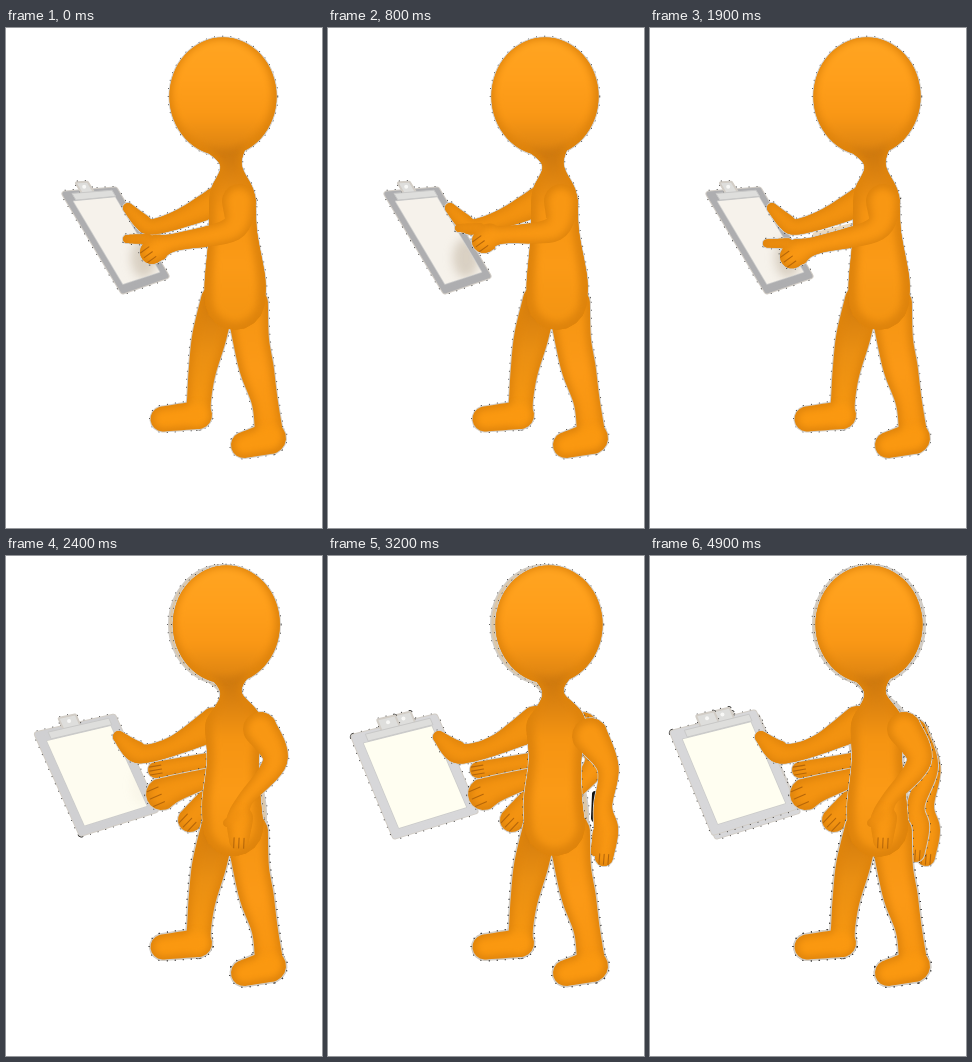
These frames come from a looping animation (316x500 px, 5 s). An HTML page with a canvas:

```html
<!DOCTYPE html>
<html lang="en">
<head>
<meta charset="utf-8">
<title>Figure with a clipboard</title>
<style>
html, body { margin: 0; width: 100%; height: 100%; overflow: hidden; background: #fff; }
canvas { display: block; width: 316px; height: 500px; }
</style>
</head>
<body>
<canvas id="stage"></canvas>
<script>
const LOOP = 5000, STEP = 100;
const canvas = document.getElementById('stage');
const ratio = window.devicePixelRatio || 1;
canvas.width = 316 * ratio;
canvas.height = 500 * ratio;
const ctx = canvas.getContext('2d');

// Joints are "x,y,radius"; corners are "x,y".
const parse = s => s.split(' ').map(p => p.split(',').map(Number));

const rig = {
  torso: [
    parse('221,116,24 225,137,10.5 226,165,22 227,205,24 229,250,30 229,272,30'),
    parse('224,116,24 225,137,10.5 228,165,29 227,205,26 225,245,29 227,270,30')
  ],
  farArm: [
    parse('214,172,15 176,190,9.5 146,199,7.5 136,194,8 122,180,5'),
    parse('208,167,17 170,188,10 142,197,9 127,195,11 111,181,6')
  ],
  // writing, forward, hanging
  arm: [
    parse('233,173,17 226,201,12.5 170,214,8.5 153,219,13 146,224,12'),
    parse('254,173,17 269,205,12 239,244,8 234,262,13 233,284,10'),
    parse('262,180,18 280,212,10.5 275,250,9 278,274,12 276,301,9')
  ],
  thumb: [
    parse('142,211,5 121,211,4'),
    parse('232,257,5 221,267,4'),
    parse('270,276,5 267,296,4')
  ],
  board: [
    parse('59,166 109,162 160,248 117,263'),
    parse('26,181 107,161 147,255 67,280')
  ]
};
const nearLeg = parse('241,276,21 245,312,18 251,342,17 259,375,13 263,405,14');
const nearFoot = parse('264,410,16 238,417,13');
const farLeg = parse('212,272,17 203,310,17 196,345,13.5 193,372,12 192,388,13');
const farFoot = parse('192,387,14 157,391,12.5');

// arm positions left standing during the swing
const trails = [
  [2100, parse('202,205,8 150,214,8')],
  [2300, parse('204,243,12 184,264,12')],
  [2200, parse('204,221,9 170,232,13 156,238,16')]
];

const writeKeys = [[0, 0], [400, -.4], [800, 1], [1300, 0], [1600, .8], [1900, -.4], [2200, 0]];
const turnKeys = [[1900, 0], [2500, 1], [4600, 1], [4900, 2]];
const armKeys = [[1900, 0], [2400, 1], [2600, 2], [4600, 2], [4700, 1.75], [4900, 1]];

const mix = (a, b, k) => a + (b - a) * k;
const blend = (a, b, k) => a.map((p, i) => p.map((v, j) => mix(v, b[i][j], k)));

function at(keys, t) {
  const i = keys.findIndex(key => t <= key[0]);
  if (i < 0) return keys[keys.length - 1][1];
  if (i === 0) return keys[0][1];
  const [t0, v0] = keys[i - 1], [t1, v1] = keys[i];
  return mix(v0, v1, (t - t0) / (t1 - t0));
}

function pose(list, k) {
  const i = Math.min(Math.floor(k), list.length - 2);
  return blend(list[i], list[i + 1], k - i);
}

function poly(points) {
  const path = new Path2D();
  points.forEach(p => path.lineTo(...p));
  path.closePath();
  return path;
}

function spline(a, b, c, d, k) {
  return b.map((v, j) => v + .5 * k * (c[j] - a[j] +
    k * (2 * a[j] - 5 * v + 4 * c[j] - d[j] + k * (3 * (v - c[j]) + d[j] - a[j]))));
}

// Soft tube around a smooth spine; fat scales its radius.
function limb(joints, fat = 1) {
  const last = joints.length - 1, n = last * 10;
  const j = i => joints[Math.max(0, Math.min(last, i))];
  const spine = Array.from({ length: n + 1 }, (_, s) => {
    const i = Math.min(Math.floor(s / 10), last - 1);
    return spline(j(i - 1), j(i), j(i + 1), j(i + 2), s / 10 - i);
  });
  const angle = i => {
    const a = spine[Math.max(0, i - 1)], b = spine[Math.min(n, i + 1)];
    return Math.atan2(b[1] - a[1], b[0] - a[0]);
  };
  const rim = (i, turn) => {
    const [x, y, r] = spine[i], a = angle(i) + turn;
    return [x + r * fat * Math.cos(a), y + r * fat * Math.sin(a)];
  };
  const left = [], right = [], tip = [], root = [];
  for (let i = 0; i <= n; i++) {
    left.push(rim(i, -Math.PI / 2));
    right.unshift(rim(i, Math.PI / 2));
  }
  for (let a = -4; a <= 4; a++) {
    tip.push(rim(n, a * Math.PI / 9));
    root.push(rim(0, Math.PI + a * Math.PI / 9));
  }
  return poly([...left, ...tip, ...right, ...root]);
}

function ball(x, y, rx, ry) {
  const path = new Path2D();
  path.ellipse(x, y, rx, ry, 0, 0, 2 * Math.PI);
  return path;
}

function fade(y0, y1, ...colors) {
  const g = ctx.createLinearGradient(0, y0, 0, y1);
  colors.forEach((c, i) => g.addColorStop(i / (colors.length - 1), c));
  return g;
}

function line(path, color, width, dash = []) {
  ctx.strokeStyle = color;
  ctx.lineWidth = width;
  ctx.setLineDash(dash);
  ctx.stroke(path);
}

function fill(path, color) {
  ctx.fillStyle = color;
  ctx.fill(path);
}

function halo(path, grow = 0) {
  line(path, '#222', 3.4 + grow, [1, 7]);
  line(path, '#d2cdc6', 2 + grow);
}

// A part is { path, core, color }: blurred cores merge into one round body.
function part(joints, color) {
  return { path: limb(joints), core: limb(joints, .74), color };
}

function skin(parts, outlined = true) {
  const whole = new Path2D();
  parts.forEach(p => whole.addPath(p.path));
  if (outlined) parts.forEach(p => halo(p.path));
  fill(whole, '#df840c');
  ctx.save();
  ctx.clip(whole);
  ctx.filter = `blur(${3.5 * ratio}px)`;
  parts.forEach(p => fill(p.core, p.color));
  ctx.restore();
}

function bodyParts(k) {
  const x = 217 + 4 * k;
  const far = fade(270, 380, '#d17a0c', '#ea8f12', '#f59610');
  const near = fade(280, 400, '#f59513', '#fb9916', '#f79510');
  return [
    part(farLeg, far), part(farFoot, '#fa9810'),
    part(nearLeg, near), part(nearFoot, '#fa9810'),
    part(pose(rig.torso, k), fade(130, 290, '#d07a0e', '#f59412', '#fb9a16', '#f39412')),
    {
      path: ball(x, 68.5, 53.5, 59),
      core: ball(x - 1, 66, 50, 55),
      color: fade(12, 126, '#ffa421', '#ff9f1b', '#f99715', '#d98110')
    }
  ];
}

// Finger lines run back from the tip of the hand.
function creases(joints, length) {
  const [a, b] = joints.slice(-2), angle = Math.atan2(b[1] - a[1], b[0] - a[0]);
  ctx.save();
  ctx.translate(b[0], b[1]);
  ctx.rotate(angle);
  for (let i = -1; i <= 1; i++) {
    line(poly([[b[2] * .8, i * b[2] * .5], [b[2] * .8 - length, i * b[2] * .5]]), '#b5660a', 1.1);
  }
  ctx.restore();
}

function drawArm(swing, write = 0, outlined = true) {
  const move = (p, weight) => [p[0] + 10 * write * weight, p[1] - 11 * write * weight, p[2]];
  const joints = pose(rig.arm, swing).map((p, i) => move(p, Math.min(1, Math.max(0, (i - 1) / 1.5))));
  const thumb = pose(rig.thumb, swing).map(p => move(p, 1));
  skin([part(joints, '#f89713'), part(thumb, '#f09010')], outlined);
  creases(joints, 10);
}

function drawBoard(k, lift) {
  const [tl, tr, br, bl] = pose(rig.board, k).map(([x, y]) => [x - 3 * lift, y - 4 * lift]);
  const spot = (u, v) => tl.map((_, j) => mix(mix(tl[j], tr[j], u), mix(bl[j], br[j], u), v));
  const quad = (u0, v0, u1, v1) => poly([spot(u0, v0), spot(u1, v0), spot(u1, v1), spot(u0, v1)]);
  const gray = mix(174, 215, k);
  const color = `rgb(${gray},${gray},${gray + 2})`;
  const base = quad(0, 0, 1, 1), sheet = quad(.08, .08, .92, .94);
  halo(base, 5);
  fill(base, color);
  line(base, color, 5);
  line(sheet, '#cbcbca', 1.5);
  fill(sheet, `rgb(${mix(246, 255, k)},${mix(242, 254, k)},${mix(235, 241, k)})`);

  if (k < 1) {
    ctx.save();
    ctx.clip(sheet);
    ctx.filter = `blur(${5 * ratio}px)`;
    fill(ball(138, 230, 13, 20), `rgba(190,176,156,${.5 * (1 - k)})`);
    ctx.restore();
  }
  const knobs = k < 1 ? [.45] : [.64, .45];
  for (const u of knobs) {
    const knob = quad(u - .1, -.1, u + .1, 0);
    halo(knob, 2);
    fill(knob, '#dededc');
    fill(ball(...spot(u, -.06), 2, 2), '#f8f8f6');
  }
  const bar = quad(.14, 0, .94, .07);
  fill(bar, '#dededc');
  line(bar, '#c9c9c8', 1);
}

function ghostBody(k, color) {
  const parts = bodyParts(k);
  parts.forEach(p => halo(p.path, 1));
  parts.forEach(p => fill(p.path, color));
}

function draw(t) {
  ctx.setTransform(ratio, 0, 0, ratio, 0, 0);
  ctx.fillStyle = '#fff';
  ctx.fillRect(0, 0, 316, 500);
  ctx.lineJoin = 'round';

  const turn = at(turnKeys, t), swing = at(armKeys, t), write = at(writeKeys, t);
  const board = Math.min(turn, 1), lift = Math.max(turn - 1, 0);
  const lean = board - lift / 2;

  if (t >= 2400) ghostBody(0, '#dcc7a8');
  if (lift) {
    ghostBody(1, '#d2cdc6');
    drawBoard(1, 0);
  }
  drawBoard(board, lift);

  if (t >= 700 && t < 2100) fill(limb(parse('202,200,5 166,208,4')), '#ead8bd');
  for (const [from, joints] of trails) {
    if (t < from) continue;
    skin([part(joints, '#f39311')]);
    creases(joints, 12);
  }
  if (t >= 2500) {
    fill(limb(parse('267,238,3 268,262,5')), '#111');
    drawArm(1);
  }
  if (lift) {
    drawArm(2);
    drawArm(1.75);
  }

  const body = bodyParts(lean);
  skin([part(pose(rig.farArm, board), '#f29210')]);
  // the shoulder outline stays behind the torso
  drawArm(swing, write);
  skin(body);
  skin([part(pose(rig.farArm, board), '#f29210')], false);
  body.slice(4, 5).forEach(p => skin([p], false));
  skin(body.slice(4), false);
  drawArm(swing, write, false);
}

let shown = -1;
const start = performance.now();
function tick() {
  const step = Math.floor(((performance.now() - start) % LOOP) / STEP);
  if (step !== shown) {
    shown = step;
    draw(step * STEP);
  }
  requestAnimationFrame(tick);
}
tick();
</script>
</body>
</html>
```
